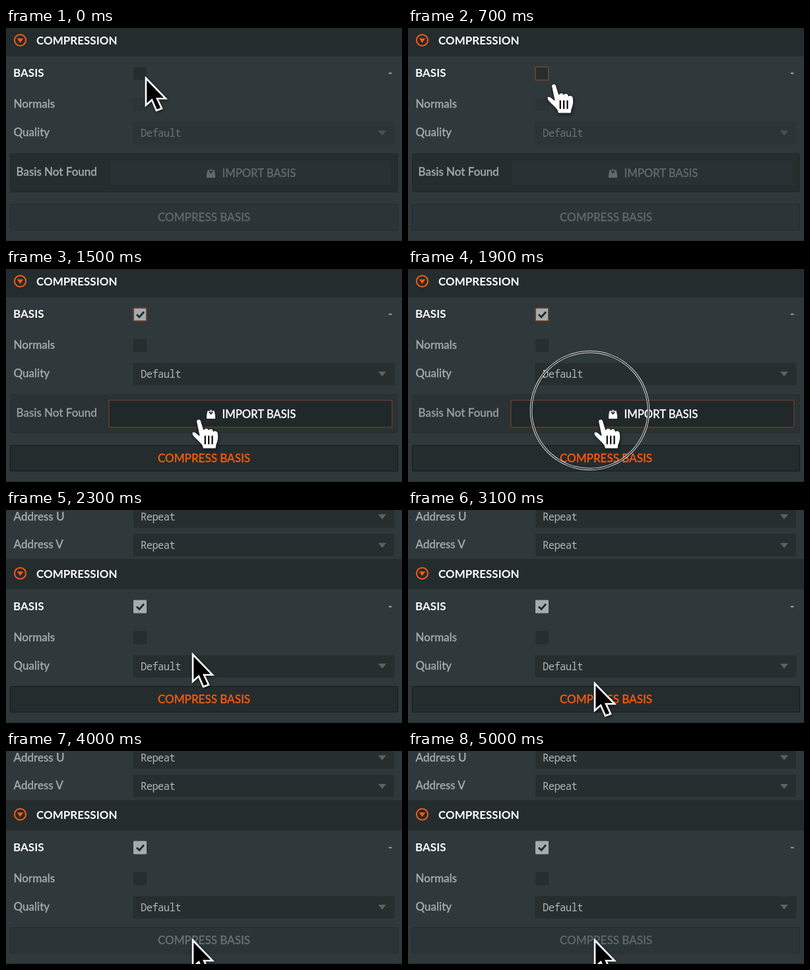
Write an HTML page that moves like this. It is 600x323 px and loops after 5400 ms.

```html
<!DOCTYPE html>
<html lang="en">
<head>
<meta charset="utf-8">
<title>Compression panel</title>
<style>
  html, body { margin: 0; width: 100%; height: 100%; overflow: hidden; background: #2f383a; }
  svg { display: block; width: 100%; height: 100%; }
  text {
    font: 500 17px Lato, "Open Sans", sans-serif;
    color: #a4abad; fill: currentColor; stroke: currentColor; stroke-width: .3;
  }
  .mono { font: 400 15.5px "Noto Sans Mono", monospace; letter-spacing: -.6px; color: #b0b6b8; stroke: none; }
  .strong { font-weight: 700; color: #fff; stroke: none; }
  .mid { text-anchor: middle; }
  .header { fill: #242c2e; }
  .accent { fill: #f65c12; }
  .field { fill: #262e30; }
  .arrow { fill: #596265; }

  /* Import row and quality field start disabled */
  #quality rect, #normals { fill: #2b3437; }
  #quality .mono { color: #6b7375; }
  #quality .arrow { fill: #495255; }
  #panel { fill: #252d2f; stroke: #20282a; }
  #import rect { fill: #293134; }
  #import text { font-size: 16.6px; color: #60696c; }
  #import .glyph { fill: #60696c; }
  #compress rect { fill: #2b3437; stroke: #242c2f; }
  #compress text { color: #5f686b; }
  #basis rect { fill: #252d2f; }
  #tick { display: none; }

  .checked #quality rect, .checked #normals { fill: #262e30; }
  .checked #quality .mono { color: #b0b6b8; }
  .checked #quality .arrow { fill: #596265; }
  .checked #panel { fill: #2a3235; stroke: #262e30; }
  .checked #missing { color: #989fa1; }
  .checked #import rect { fill: #323b3e; }
  .checked #import text { color: #a0a7a9; }
  .checked #import .glyph { fill: #a0a7a9; }
  .checked #compress rect { fill: #252c2e; stroke: #171d1f; }
  .checked #compress text { color: #fa5a0a; }
  .checked #basis rect { fill: #a5abad; }
  .checked #tick { display: inline; }

  .focused #basis rect { stroke: #65402d; stroke-width: 2; }
  .over-quality #quality rect { fill: #1f2628; stroke: #3f352f; }
  .over-quality #quality .mono { color: #fff; }
  .over-quality #quality .arrow { fill: #7b8486; }
  .over-import #import rect { fill: #20282a; stroke: #653d27; stroke-width: 1.5; }
  .over-import #import text { color: #fff; }
  .over-import #import .glyph { fill: #fff; }
  .over-compress #compress rect { fill: #20272a; stroke: #653d27; }
  .over-compress #compress text { color: #fff; }
  .busy #compress rect { fill: #2b3437; stroke: #262e31; }
  .busy #compress text { color: #5f686b; }
  .fading #compress text { color: #687073; }

  .imported #importRow, #addresses { display: none; }
  .imported #addresses { display: inline; }
  #cursor { filter: drop-shadow(1px 2px 2px rgba(0, 0, 0, .45)); }
</style>
</head>
<body>
<svg id="stage" viewBox="0 0 600 323" preserveAspectRatio="none">
  <defs>
    <path id="down" d="M564 0H576L570 7.5Z"/>
  </defs>
  <rect width="600" height="323" fill="#2f383a"/>

  <g id="addresses">
    <text x="11.500" y="16">Address U</text>
    <rect class="field" x="193" y="-7" width="395" height="34"/>
    <text class="mono" x="204" y="16">Repeat</text>
    <use href="#down" y="6.500" class="arrow"/>
    <text x="11.500" y="58">Address V</text>
    <rect class="field" x="193" y="36" width="395" height="34"/>
    <text class="mono" x="204" y="59">Repeat</text>
    <use href="#down" y="50" class="arrow"/>
  </g>

  <g id="section">
    <rect class="header" y="-3" width="600" height="46"/>
    <circle cx="21.500" cy="18.500" r="8.600" fill="none" stroke="#f65c12" stroke-width="2"/>
    <path class="accent" d="M16.800 15.800H26.200L21.500 22.500Z"/>
    <text class="strong" x="46" y="25">COMPRESSION</text>

    <text class="strong" x="11" y="74">BASIS</text>
    <g id="basis">
      <rect x="193" y="59" width="20" height="20" rx="1"/>
      <path id="tick" d="M198 69L202 73L209 65" fill="none" stroke="#20282a" stroke-width="2.800"/>
    </g>
    <text x="579" y="74">-</text>

    <text x="11.500" y="121">Normals</text>
    <rect id="normals" x="193" y="106" width="20" height="20"/>

    <text x="11.500" y="164">Quality</text>
    <g id="quality">
      <rect x="192.500" y="142.500" width="396" height="34"/>
      <text class="mono" x="204" y="165">Default</text>
      <use href="#down" y="155.500" class="arrow"/>
    </g>
  </g>

  <g id="importRow">
    <rect id="panel" x="6.500" y="190.500" width="587" height="58" rx="2"/>
    <text id="missing" x="15.500" y="224">Basis Not Found</text>
    <g id="import">
      <rect id="importFace"/>
      <path class="glyph" d="M305.500 215H308.500V217H307L310.500 221L314 217H312.500V215H315.500L317 222V227H304V222ZM309.500 213.500H311.500V217.500H309.500Z"/>
      <text x="327.500" y="226">IMPORT BASIS</text>
    </g>
  </g>

  <g id="compress">
    <rect x="6.500" y="267.500" width="587" height="39" rx="2" stroke-width="1.200"/>
    <text class="mid" x="300" y="293">COMPRESS BASIS</text>
  </g>
  <rect y="322" width="600" height="1" fill="#252f32"/>

  <g id="ring" fill="none">
    <circle stroke="#e8eaea" stroke-width="3.400"/>
    <circle stroke="#111618" stroke-width="1.500"/>
  </g>

  <g id="cursor">
    <path id="pointer" d="M0 0V41L9 33L16 49L24 46L17 31H30Z" fill="#000" stroke="#fff" stroke-width="2.600"/>
    <g id="hand" transform="translate(9 10) scale(1.08)">
      <path d="M-3 3C-4 -1 1.500 -2.500 3 1L7 14C8 11 13 11 14 14C16 11 20 12 20.500 16C23 14 27 16 27 19C28 25 27 30 25 34L24 40H6L5 36C2 31 -4 27 -8 22C-11 18 -8 15 -4 18L1 22Z" fill="#fff" stroke="#101416" stroke-width=".8"/>
      <path d="M9 22V34M14 22V34M19 22V34" stroke="#000" stroke-width="2"/>
    </g>
  </g>
</svg>

<script>
const LOOP = 5400, STEP = 100;
const $ = id => document.getElementById(id);
const stage = $('stage');
const circles = $('ring').querySelectorAll('circle');

// Cursor path: time, x, y of the pointer tip
const path = [
  [0, 212, 76], [800, 212, 76], [1200, 272, 179], [1500, 283, 219],
  [2800, 283, 219], [3300, 283, 287], [LOOP, 283, 287]
];
const clicks = [200, 1700, 3600];
const ringRadii = [48, 76, 89, 93];

const within = (t, from, to) => t >= from && t < to;
const smooth = k => k * k * (3 - 2 * k);

function setAttributes(el, values) {
  for (const name in values) el.setAttribute(name, values[name]);
}

function cursorAt(t) {
  const i = path.findIndex(p => p[0] > t);
  const [t0, x0, y0] = path[i - 1], [t1, x1, y1] = path[i];
  const k = smooth((t - t0) / (t1 - t0));
  return [x0 + (x1 - x0) * k, y0 + (y1 - y0) * k];
}

function drawRing(t, x, y) {
  const start = clicks.find(c => within(t, c, c + ringRadii.length * STEP));
  $('ring').style.display = start === undefined ? 'none' : '';
  if (start === undefined) return;
  const n = (t - start) / STEP;
  circles.forEach(c => c.setAttribute('r', ringRadii[n]));
  setAttributes($('ring'), {
    opacity: n === ringRadii.length - 1 ? 0.4 : 1,
    transform: `translate(${x - 7.5} ${y - 4.5})`
  });
}

// The import button grows slightly while hovered
function drawImport(hovered) {
  const grow = hovered ? 2 : 0;
  setAttributes($('importFace'), {
    x: 158 - grow, y: 201 - grow, width: 425 + 2 * grow, height: 37 + 2 * grow, rx: grow
  });
}

function render(t) {
  const [x, y] = cursorAt(t);
  const imported = t >= 2200;
  const states = {
    checked: t >= 800,
    focused: within(t, 100, 2200),
    'over-quality': within(t, 1100, 1300),
    'over-import': within(t, 1400, 2200),
    imported,
    'over-compress': within(t, 3200, 3800),
    busy: t >= 3800,
    fading: within(t, 3800, 4100)
  };
  for (const name in states) stage.classList.toggle(name, states[name]);

  const hand = within(t, 100, 900) || states['over-quality'] ||
    states['over-import'] || states['over-compress'];
  $('hand').style.display = hand ? '' : 'none';
  $('pointer').style.display = hand ? 'none' : '';
  $('cursor').setAttribute('transform', `translate(${x} ${y})`);
  $('section').setAttribute('transform', `translate(0 ${imported ? 77.5 : 0})`);
  drawImport(states['over-import']);
  drawRing(t, x, y);
}

const begin = performance.now();
function tick() {
  const t = (performance.now() - begin) % LOOP;
  render(Math.floor(t / STEP) * STEP);
  requestAnimationFrame(tick);
}
tick();
</script>
</body>
</html>
```
